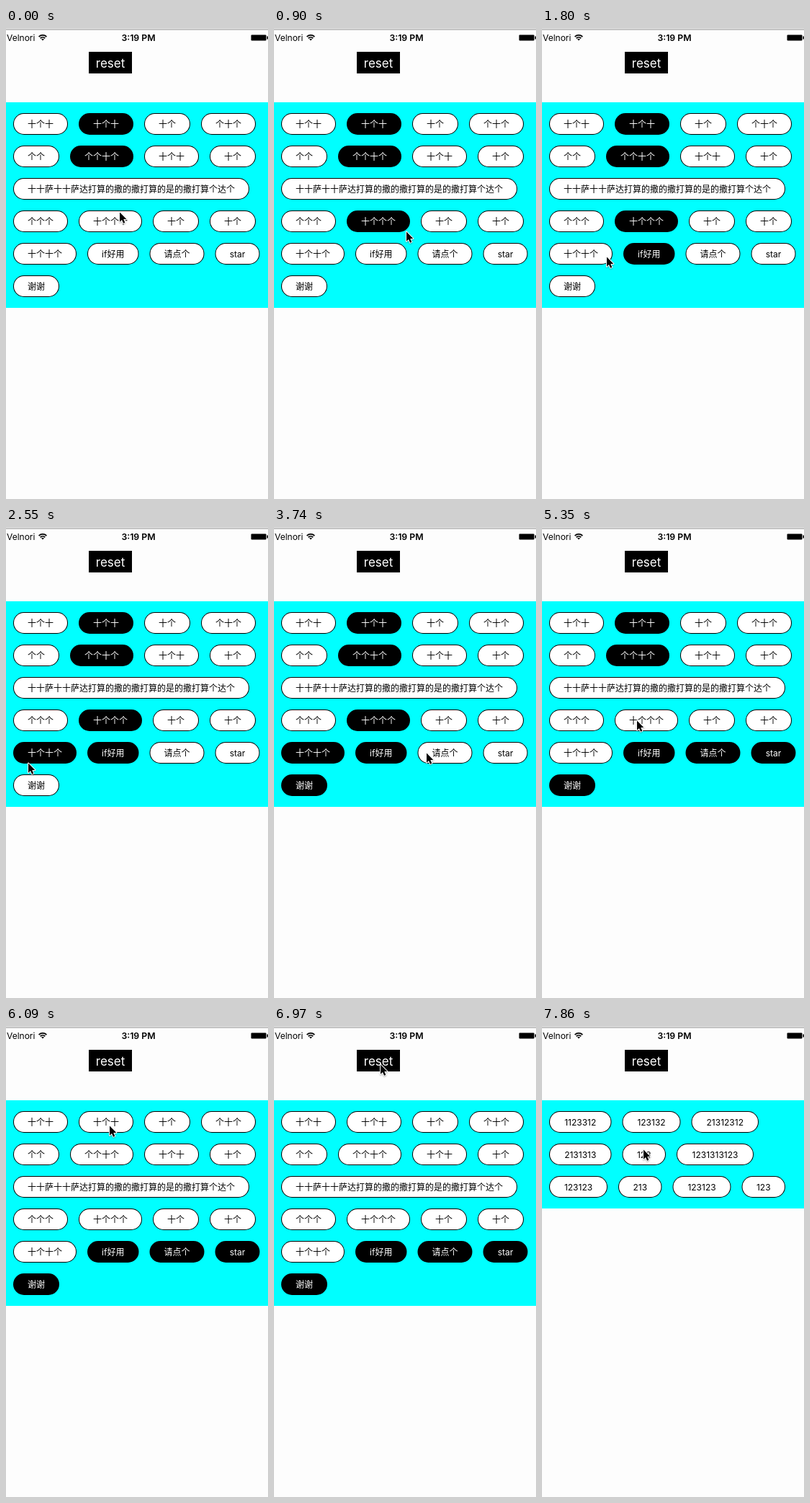
Recreate the animation shown at these times as an HTML page with a canvas. Size 364 px wide and 653 px high, loop 8000 ms.

```html
<!DOCTYPE html>
<html lang="zh">
<head>
<meta charset="utf-8">
<style>
html, body { margin: 0; width: 100%; height: 100%; overflow: hidden; background: #fdfdfd; }
canvas { display: block; width: 364px; height: 653px; }
</style>
</head>
<body>
<canvas id="stage" width="364" height="653"></canvas>
<script>
const ctx = document.getElementById('stage').getContext('2d');
const WIDTH = 364, HEIGHT = 653, LOOP = 8000, LAST_TICK = 53;
const FONT = 'Inter, "Noto Sans CJK SC", "Noto Sans CJK", sans-serif';
const GAP = 15, LEFT = 10, TOP = 118, ROW = 45, TAG_HEIGHT = 30;

const chinesePage = layout('十个十 十个十 十个 个十个 个个 个个十个 十个十 十个 ' +
  '十十萨十十萨达打算的撒的撒打算的是的撒打算个达个 个个个 十个个个 十个 十个 ' +
  '十个十个 if好用 请点个 star 谢谢');
const numberPage = layout('1123312 123132 21312312 2131313 123 1231313123 123123 213 123123 123');

// Where the pointer stops, the tick it arrives, and what it presses there.
const stops = [
  { at: 0, x: 157, y: 254 },
  { at: 1, x: 160, y: 264, press: 10 },
  { at: 6, x: 183, y: 281 },
  { at: 9, x: 163, y: 317, press: 14 },
  { at: 15, x: 37, y: 316, press: 13 },
  { at: 17, x: 30, y: 326 },
  { at: 19, x: 38, y: 350, press: 17 },
  { at: 25, x: 211, y: 312, press: 15 },
  { at: 27, x: 305, y: 314, press: 16, wait: 2 },
  { at: 32, x: 144, y: 271 },
  { at: 33, x: 70, y: 311, press: 13 },
  { at: 35, x: 131, y: 267, press: 10 },
  { at: 37, x: 135, y: 176, press: 5, wait: 2 },
  { at: 40, x: 143, y: 137, press: 1, wait: 2 },
  { at: 47, x: 147, y: 52, press: 'reset', wait: 4 },
  { at: 53, x: 140, y: 170 }
];
const pressTick = stop => stop.at + Math.min(stop.wait || 1, 2) - (stop.press === 16 || stop.press === 1 ? 1 : 0);

function tagWidth(label) {
  const advance = { 1: 5.6, 2: 7.2, 3: 7.5, i: 3, f: 4.3 };
  const width = [...label].reduce((sum, c) => sum + (advance[c] || (c > '~' ? 12 : 5.5)), 0);
  return 40 + Math.ceil(width * 2 - 0.01) / 2;
}

function layout(labels) {
  let x = LEFT, y = TOP;
  const tags = labels.split(' ').map(label => {
    const w = tagWidth(label);
    if (x + w > WIDTH - LEFT) { x = LEFT; y += ROW; }
    const tag = { label, x, y, w };
    x += w + GAP;
    return tag;
  });
  return { tags, bottom: y + ROW };
}

// Ticks last 150 ms, shortened by 10 ms on every fourth one after a while.
function tickAt(time) {
  const start = n => 150 * n - 10 * Math.max(0, Math.floor((n - 14) / 4));
  let tick = Math.floor(time / 150);
  while (start(tick + 1) <= time) tick++;
  return Math.min(tick, LAST_TICK);
}

function pointerAt(tick) {
  const next = stops.findIndex(stop => stop.at >= tick);
  const to = stops[next], from = stops[Math.max(0, next - 1)];
  const leave = from.at + (from.wait || (from.press ? 1 : 0));
  const k = to === from ? 1 : Math.max(0, (tick - leave) / (to.at - leave));
  const eased = Math.sin(k * Math.PI / 2);
  return ['x', 'y'].map(axis => Math.round(from[axis] + (to[axis] - from[axis]) * eased));
}

function rect(x, y, w, h, color, radius = 0) {
  ctx.beginPath();
  ctx.roundRect(x, y, w, h, radius);
  ctx.fillStyle = color;
  ctx.fill();
}

function text(label, x, y, size, color, align = 'center', weight = 400) {
  ctx.font = `${weight} ${size}px ${FONT}`;
  ctx.textAlign = align;
  ctx.fillStyle = color;
  ctx.fillText(label, x, y);
}

function drawTag({ label, x, y, w }, selected) {
  rect(x, y, w, TAG_HEIGHT, '#000', 15);
  if (!selected) rect(x + 1, y + 1, w - 2, TAG_HEIGHT - 2, '#fff', 14);
  text(label, x + w / 2, y + 19.5, 12, selected ? '#fff' : '#000');
}

function drawWifi(x, y) {
  const from = -Math.PI * 0.75, to = -Math.PI * 0.25;
  ctx.strokeStyle = ctx.fillStyle = '#000';
  ctx.lineWidth = 1.8;
  for (const radius of [4.6, 7.6]) {
    ctx.beginPath();
    ctx.arc(x, y, radius, from, to);
    ctx.stroke();
  }
  ctx.beginPath();
  ctx.moveTo(x, y);
  ctx.arc(x, y, 2.7, from, to);
  ctx.fill();
}

function drawHeader() {
  rect(0, 0, WIDTH, 2, '#d5d5d5');
  rect(0, 2, WIDTH, 1, '#b4b4b4');
  text('Velnori', 1, 17.5, 12, '#000', 'left');
  drawWifi(51, 17.5);
  text('3:19 PM', 184, 17.5, 12.3, '#000', 'center', 600);
  rect(340.5, 9.5, 21, 8, '#000', 1);
  rect(362.5, 11.5, 1.5, 4, '#000');
  rect(115, 33, 60, 30, '#000');
  text('reset', 145, 54.5, 17, '#fff');
}

function drawPointer([x, y]) {
  ctx.save();
  ctx.translate(x + 1, y + 1.5);
  ctx.beginPath();
  [[0, 0], [0, 13.2], [3, 10.4], [5.1, 15.2], [7.3, 14.2], [5.3, 9.6], [9.4, 9.4]]
    .forEach(p => ctx.lineTo(...p));
  ctx.closePath();
  ctx.lineJoin = 'round';
  ctx.lineWidth = 2;
  ctx.strokeStyle = '#fff';
  ctx.shadowColor = 'rgba(0,0,0,0.3)';
  ctx.shadowBlur = 2;
  ctx.shadowOffsetY = 1;
  ctx.stroke();
  ctx.shadowColor = 'transparent';
  ctx.fillStyle = '#000';
  ctx.fill();
  ctx.restore();
}

function render(time) {
  const tick = tickAt(time % LOOP);
  const pressed = stops.filter(stop => stop.press && pressTick(stop) <= tick).map(stop => stop.press);
  const reloaded = pressed.includes('reset');
  const page = reloaded ? numberPage : chinesePage;
  const initial = [1, 5];
  const isSelected = i => !reloaded && [...initial, ...pressed].filter(p => p === i).length % 2 === 1;

  rect(0, 0, WIDTH, HEIGHT, '#fdfdfd');
  drawHeader();
  rect(0, 103, WIDTH, page.bottom - 103, '#0ff');
  page.tags.forEach((tag, i) => drawTag(tag, isSelected(i)));
  drawPointer(pointerAt(tick));
}

const began = performance.now();
function loop() {
  render(performance.now() - began);
  requestAnimationFrame(loop);
}
loop();
</script>
</body>
</html>
```
